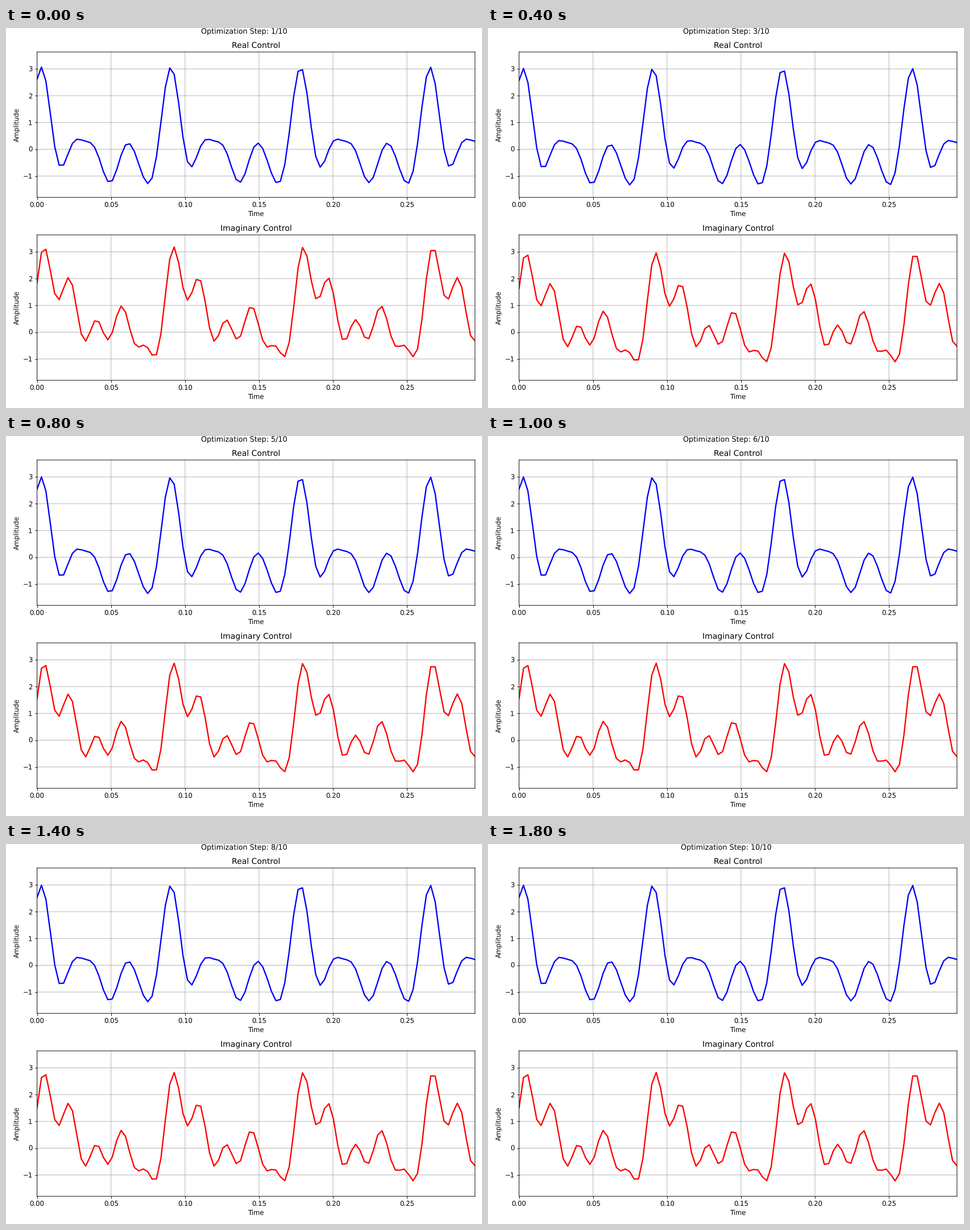
Recreate the animation shown at these times as a matplotlib script. Size 837 by 669 pixels, loop 2000 ms.

```python
import numpy as np
import matplotlib.pyplot as plt
from matplotlib.animation import FuncAnimation

W, H, DPI = 837, 669, 83.7
STEPS = 10
N = 100            # samples across the time axis
PERIOD = 29.3      # samples per pulse period
T_END = 0.296

# Soft, unsnapped lines and glyphs.
plt.rcParams.update({"path.snap": False, "text.hinting": "none"})

# Share of the total correction reached at each step: two jumps, then plateaus.
PROGRESS = [0, 0.01, 0.62, 0.87, 0.87, 0.87, 0.93, 1, 1, 1]

idx = np.arange(N)
time = idx * T_END / (N - 1)
theta = 2 * np.pi * idx / PERIOD


def pulse(mean, cosines, sines):
    """Fourier series over the sample phases."""
    y = np.full(N, float(mean))
    for k, a in enumerate(cosines, 1):
        y += a * np.cos(k * theta)
    for k, b in enumerate(sines, 1):
        y += b * np.sin(k * theta)
    return y


real = pulse(0.104, [0.740, 0.515, 0.897, 0.361], [0.468, 0.198, 0.637, 0.118, 0.190])
imag = pulse(0.619, [0.515, 0.088, 0.338, 0.278], [0.846, 0.886, 0.223, 0.159, 0.598])
real_drift = pulse(-0.082, [], [])
imag_drift = pulse(-0.328, [-0.006], [-0.030, -0.013])

fig = plt.figure(figsize=((W + 0.01) / DPI, (H + 0.01) / DPI), dpi=DPI,
                 facecolor="white")


def panel(top, title, color):
    left, width, height = 54.6, 770.1, 256
    ax = fig.add_axes([left / W, 1 - (top + height) / H, width / W, height / H])
    ax.set(xlim=(0, T_END), ylim=(-1.795, 3.632), title=title)
    ax.set_xlabel("Time", labelpad=2.8)
    ax.set_ylabel("Amplitude")
    ax.set_xticks(np.arange(0, 0.26, 0.05))
    ax.set_yticks(range(-1, 4))
    ax.grid(True)
    return ax.plot([], [], color=color, lw=2)[0]


real_line = panel(42.2, "Real Control", "blue")
imag_line = panel(364.2, "Imaginary Control", "red")
heading = fig.text(0.5, 1 - 10 / H, "", fontsize=11, ha="center", va="baseline")


def draw(step):
    p = PROGRESS[step]
    real_line.set_data(time, real + p * real_drift)
    imag_line.set_data(time, imag + p * imag_drift)
    heading.set_text(f"Optimization Step: {step + 1}/{STEPS}")
    return real_line, imag_line, heading


anim = FuncAnimation(fig, draw, frames=STEPS, interval=200, repeat=True,
                     repeat_delay=0, blit=False)
plt.show()
```
